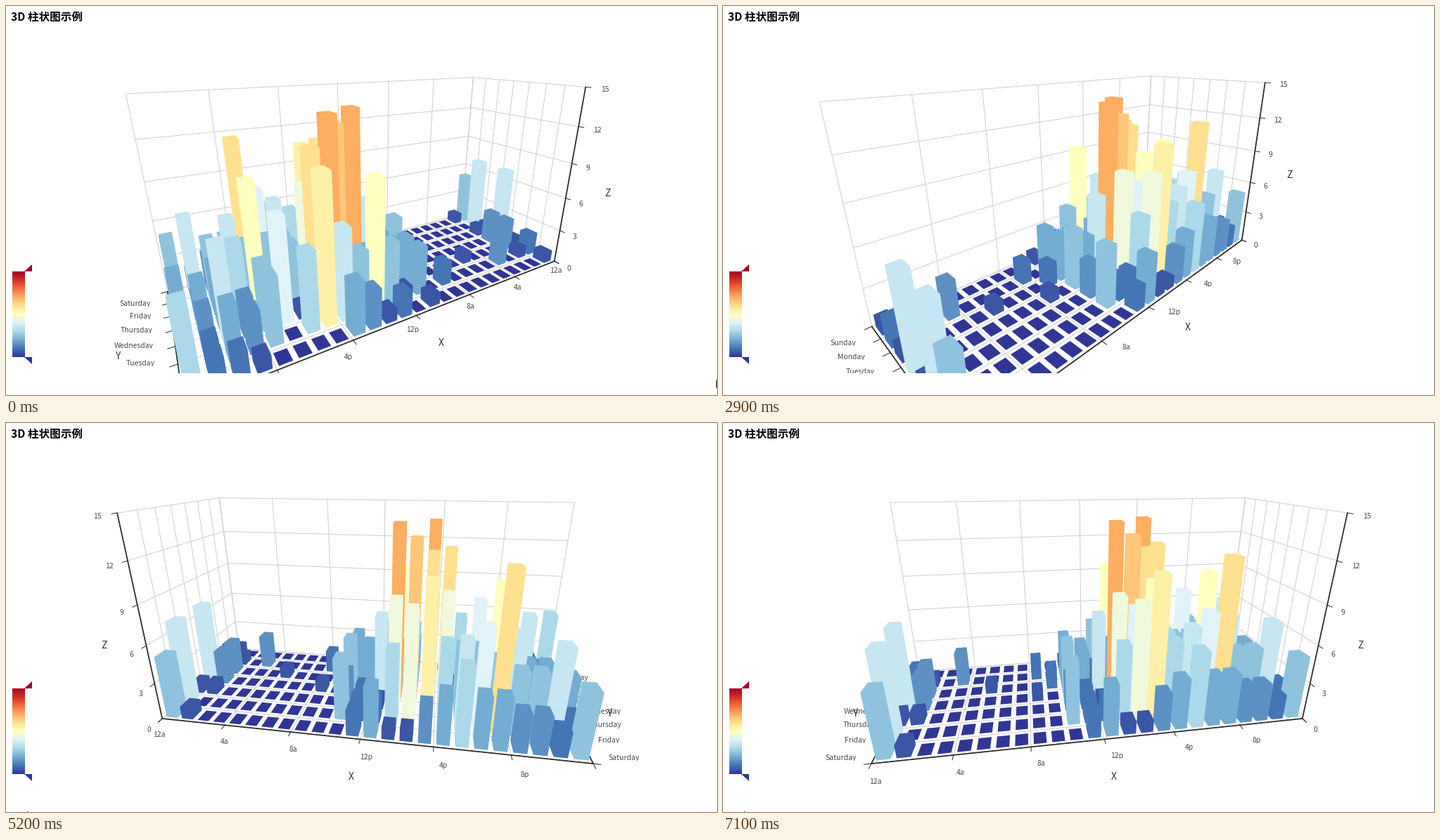
A matplotlib script that plays this animation: 1011 px wide and 554 px high, repeating every 7.2 s.

```python
import numpy as np
import matplotlib.pyplot as plt
from matplotlib.animation import FuncAnimation
from matplotlib.collections import LineCollection
from matplotlib.colors import LinearSegmentedColormap
from matplotlib.patches import Polygon, Rectangle
from matplotlib.transforms import Bbox, TransformedBbox

W, H, DPI = 1011, 554, 64
PX = 72 / DPI                        # points per pixel
FONT = "Noto Sans CJK JP"
FRAMES, STEP = 72, 18                # degrees turned per frame

# chart viewport and camera
LEFT, TOP, BOTTOM = 3, 3, 523
CX, CY = 523, 263
DIST, TILT = 200, np.radians(20)
FOCAL = 260 / np.tan(np.radians(25))
SA, CA = np.sin(TILT), np.cos(TILT)

# box half sizes: hours, value, days
BX, BY, BZ = 100, 50, 40
DX, DZ = 2 * BX / 24, 2 * BZ / 7
Z_MAX = 15

DAYS = ["Saturday", "Friday", "Thursday", "Wednesday",
        "Tuesday", "Monday", "Sunday"]
HOURS = ["12a", "4a", "8a", "12p", "4p", "8p"]

# values from 10a to 11p, one row per day
LATE = [
    [0, 2, 4, 1, 1, 3, 4, 6, 4, 4, 3, 3, 2, 5],
    [5, 2, 2, 6, 9, 11, 6, 7, 8, 12, 5, 5, 7, 2],
    [3, 2, 1, 9, 8, 10, 6, 5, 5, 5, 7, 4, 2, 4],
    [5, 4, 7, 14, 13, 12, 9, 5, 5, 10, 6, 4, 4, 1],
    [4, 4, 2, 4, 4, 14, 12, 1, 8, 5, 3, 7, 3, 0],
    [4, 1, 5, 10, 5, 7, 11, 6, 0, 5, 3, 4, 2, 0],
    [1, 0, 2, 1, 3, 4, 0, 0, 0, 0, 1, 2, 2, 6],
]
# the few values before 10a: day -> {hour: value}
EARLY = {0: {0: 5, 1: 1}, 1: {0: 7}, 2: {0: 1, 1: 1}, 3: {0: 7, 1: 3, 8: 1},
         4: {0: 1, 1: 3, 5: 1, 9: 2}, 5: {0: 2, 1: 1, 3: 3, 8: 2}, 6: {0: 1}}

values = np.zeros((7, 24))
values[:, 10:] = LATE
for day, cells in EARLY.items():
    for hour, v in cells.items():
        values[day, hour] = v

CMAP = LinearSegmentedColormap.from_list("heat", [
    "#313695", "#4575b4", "#74add1", "#abd9e9", "#e0f3f8", "#ffffbf",
    "#fee090", "#fdae61", "#f46d43", "#d73027", "#a50026"], N=2001)


def hour_x(h):
    return -BX + DX * h


def day_z(d):
    return BZ - DZ * d


def value_y(v):
    return -BY + 2 * BY * v / Z_MAX


def hull(points):
    pts = sorted(set(map(tuple, points)))

    def half(seq):
        out = []
        for p in seq:
            while len(out) > 1 and (
                    (out[-1][0] - out[-2][0]) * (p[1] - out[-2][1])
                    <= (out[-1][1] - out[-2][1]) * (p[0] - out[-2][0])):
                out.pop()
            out.append(p)
        return out[:-1]

    return half(pts) + half(pts[::-1])


class View:
    """Camera turned by an angle around the vertical axis."""

    def __init__(self, deg):
        self.c, self.s = np.cos(np.radians(deg)), np.sin(np.radians(deg))
        self.near_x = BX * np.sign(self.s)
        self.near_z = BZ * np.sign(self.c)

    def project(self, p):
        x, y, z = np.moveaxis(np.asarray(p, float), -1, 0)
        across = x * self.c - z * self.s
        toward = x * self.s + z * self.c
        depth = DIST - y * SA - toward * CA
        up = y * CA - toward * SA
        return np.stack([CX + FOCAL * across / depth,
                         CY - FOCAL * up / depth], -1)

    def order(self, x, z):
        """Drawing order: the nearer to the camera, the later."""
        reach = DIST * CA
        return 1000 - abs(x - reach * self.s) - abs(z - reach * self.c)


fig = plt.figure(figsize=(W / DPI, H / DPI), dpi=DPI, facecolor="white")

page = fig.add_axes([0, 0, 1, 1])
ramp = CMAP(np.linspace(1, 0, 256))[:, None]
page.imshow(ramp, extent=(9, 26.3, 499.8, 378.4), aspect="auto",
            interpolation="bilinear")
page.add_patch(Polygon([(26.3, 378.4), (36.8, 378.4), (36.8, 368)],
                       color=CMAP(1.0), lw=0))
page.add_patch(Polygon([(26.3, 499.8), (36.8, 499.8), (36.8, 510.3)],
                       color=CMAP(0.0), lw=0))
page.text(7, 21, "3D 柱状图示例", family=FONT, weight="bold",
          size=15.6 * PX, color="black", va="baseline")
caret = page.add_patch(Rectangle((1010, 533), 1, 11, color="black", lw=0))
dot = page.add_patch(Rectangle((30, 553), 1, 1, color="black", lw=0))
page.set(xlim=(0, W), ylim=(H, 0))
page.axis("off")

ax = fig.add_axes([LEFT / W, (H - BOTTOM) / H,
                   (W - LEFT) / W, (BOTTOM - TOP) / H])
ax.set(xlim=(LEFT, W), ylim=(BOTTOM, TOP))
ax.axis("off")

grid = ax.add_collection(LineCollection([], colors="#cccccc",
                                        linewidths=0.95 * PX, zorder=0),
                         autolim=False)

bars = []
for d in range(7):
    for h in range(24):
        x, z, v = hour_x(h + 0.5), day_z(d + 0.5), values[d, h]
        corners = [(x + i * 0.35 * DX, y, z + k * 0.35 * DZ)
                   for i in (-1, 1) for k in (-1, 1)
                   for y in (-BY, value_y(v))]
        patch = ax.add_patch(Polygon([(0, 0)] * 3, fc=CMAP(v / 20), lw=0))
        bars.append((patch, x, z))
        bars[-1] += (corners,)

strokes = [ax.plot([], [], color="#2b2b2b", solid_capstyle="round")[0]
           for _ in range(53)]
texts = [ax.text(0, 0, "", family=FONT, clip_on=True) for _ in range(22)]


def grid_lines(view):
    wx, wz = -view.near_x, -view.near_z
    lines = []
    for h in range(0, 25, 4):
        x = hour_x(h)
        lines += [[(x, -BY, -BZ), (x, -BY, BZ)], [(x, -BY, wz), (x, BY, wz)]]
    for d in range(8):
        z = day_z(d)
        lines += [[(-BX, -BY, z), (BX, -BY, z)], [(wx, -BY, z), (wx, BY, z)]]
    for v in range(0, Z_MAX + 1, 3):
        y = value_y(v)
        lines += [[(-BX, y, wz), (BX, y, wz)], [(wx, y, -BZ), (wx, y, BZ)]]
    return view.project(lines)


def alignment(ends):
    dx, dy = ends[1] - ends[0]
    if abs(dy) < 0.25 * abs(dx):
        return "center", True
    return ("left" if ends[:, 0].mean() > CX else "right"), False


def draw_axes(view):
    nx, nz = view.near_x, view.near_z
    ox, oz = np.sign(nx), np.sign(nz)
    stroke, label = iter(strokes), iter(texts)

    def line(a, b, width, x, z):
        ln = next(stroke)
        ln.set_data(*view.project([a, b]).T)
        ln.set_linewidth(width * PX)
        ln.set_zorder(view.order(x, z))

    def write(s, p, align, size=10.4, color="#484848"):
        ha, below = align
        x, y = view.project(p)
        name = size > 12
        y += (13 if name else 10.8) if below else (6 if name else 4.8)
        t = next(label)
        t.set(text=s, position=(x, y), ha=ha, va="baseline", color=color,
              fontsize=size * PX, zorder=view.order(p[0], p[2]))
        # label sprites lose their descenders
        cut = max(TOP + 0.1, min(BOTTOM, y + 1.2))
        t.set_clip_box(TransformedBbox(Bbox.from_extents(LEFT, TOP, W, cut),
                                       ax.transData))

    def name(s, p, align):
        write(s, p, align, 13.9, "#333333")

    # hours along the near long edge
    align = alignment(view.project([(-BX, -BY, nz), (BX, -BY, nz)]))
    for h in range(24):
        line((hour_x(h), -BY, nz), (hour_x(h + 1), -BY, nz), 1.75,
             hour_x(h + 0.5), nz + 4 * oz)
    for h in range(0, 25, 4):
        x = hour_x(h)
        line((x, -BY, nz), (x, -BY, nz + 3 * oz), 1, x, nz + 4 * oz)
    for k, s in enumerate(HOURS):
        write(s, (hour_x(4 * k + 0.5), -BY, nz + 8 * oz), align)
    name("X", (0, -BY, nz + 20 * oz), align)

    # days along the near short edge
    align = alignment(view.project([(nx, -BY, BZ), (nx, -BY, -BZ)]))
    for d in range(7):
        line((nx, -BY, day_z(d)), (nx, -BY, day_z(d + 1)), 1.75,
             nx + 4 * ox, day_z(d + 0.5))
    for d in range(8):
        z = day_z(d)
        line((nx, -BY, z), (nx + 3 * ox, -BY, z), 1, nx + 4 * ox, z)
    for d, s in enumerate(DAYS):
        write(s, (nx + 8 * ox, -BY, day_z(d + 0.5)), align)
    name("Y", (nx + 20 * ox, -BY, 0), align)

    # values on the upright edge
    align = alignment(view.project([(-nx, -BY, nz), (-nx, BY, nz)]))
    line((-nx, -BY, nz), (-nx, BY, nz), 1.75, -nx, nz + 4 * oz)
    for v in range(0, Z_MAX + 1, 3):
        y = value_y(v)
        line((-nx, y, nz), (-nx, y, nz + 3 * oz), 1, -nx, nz + 4 * oz)
        write(str(v), (-nx, y, nz + 8 * oz), align)
    name("Z", (-nx, 0, nz + 20 * oz), align)


def update(i):
    # the turn starts slightly late
    view = View(153 + STEP * i if i else 150)
    grid.set_segments(grid_lines(view))
    for patch, x, z, corners in bars:
        patch.set_xy(hull(view.project(corners)))
        patch.set_zorder(view.order(x, z))
    draw_axes(view)
    caret.set_visible(i < 4)
    dot.set_visible(i >= 52)
    return []


anim = FuncAnimation(fig, update, frames=FRAMES, interval=100, repeat=True)
plt.show()
```
